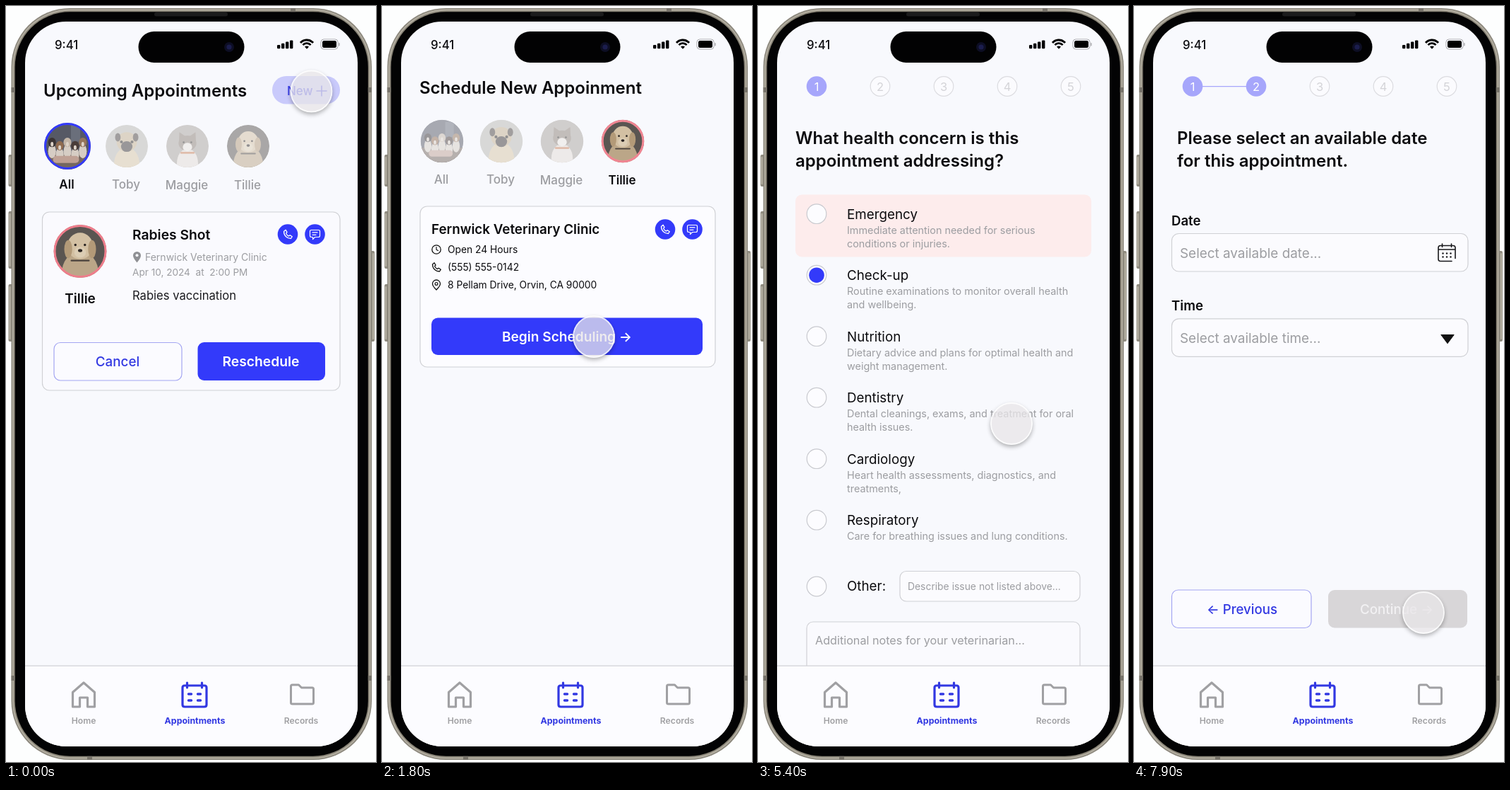
An HTML page with a canvas that plays this animation: 524 px wide and 1068 px high, repeating every 8 s.

```html
<!DOCTYPE html>
<html lang="en">
<head>
<meta charset="utf-8">
<title>Vet appointments</title>
<style>
html, body { margin: 0; width: 100%; height: 100%; overflow: hidden; background: #fdfefe; }
canvas { display: block; width: 524px; height: 1068px; }
</style>
</head>
<body>
<canvas id="stage"></canvas>
<script>
const W = 524, H = 1068, LOOP = 8000;
const SCREEN = { x: 27, y: 22, w: 471, h: 1024, r: 58 };
const BLUE = '#333afa', INK = '#0b0b0e', GREY = '#9c9da1', LINE = '#d0d1d5', LILAC = '#a6a6fb';
const CLINIC = 'Fernwick Veterinary Clinic';
const PETS = ['All', 'Toby', 'Maggie', 'Tillie'];
const ART = ['pack', 'pug', 'cat', 'pup'];

const canvas = document.getElementById('stage');
const ctx = canvas.getContext('2d');
const ratio = window.devicePixelRatio || 1;
canvas.width = W * ratio;
canvas.height = H * ratio;

// --- helpers ---
const clamp = v => Math.max(0, Math.min(1, v));
const ease = v => (1 - Math.cos(Math.PI * clamp(v))) / 2;
const mix = (a, b, p) => a + (b - a) * p;

function text(s, x, y, size, weight = 400, color = INK, align = 'left') {
  ctx.font = `${weight} ${size}px Inter, sans-serif`;
  ctx.textAlign = align;
  ctx.fillStyle = color;
  ctx.fillText(s, x, y);
}

function box(x0, y0, x1, y1, r, fill, stroke, lw = 1.2) {
  ctx.beginPath();
  ctx.roundRect(x0, y0, x1 - x0, y1 - y0, r);
  paint(fill, stroke, lw);
}

function oval(x, y, rx, ry, fill, stroke, lw = 1.2) {
  ctx.beginPath();
  ctx.ellipse(x, y, rx, ry, 0, 0, Math.PI * 2);
  paint(fill, stroke, lw);
}

function paint(fill, stroke, lw) {
  if (fill) { ctx.fillStyle = fill; ctx.fill(); }
  if (stroke) { ctx.strokeStyle = stroke; ctx.lineWidth = lw; ctx.stroke(); }
}

function shape(d, x, y, fill, stroke, lw) {
  ctx.save();
  ctx.translate(x, y);
  ctx.lineJoin = ctx.lineCap = 'round';
  const p = new Path2D(d);
  if (fill) { ctx.fillStyle = fill; ctx.fill(p); }
  if (stroke) { ctx.strokeStyle = stroke; ctx.lineWidth = lw; ctx.stroke(p); }
  ctx.restore();
}

function pair(x, y, rx, ry, color) {
  oval(-x, y, rx, ry, color);
  oval(x, y, rx, ry, color);
}

// --- pet pictures, drawn in a unit circle ---
const art = {
  pup() {
    oval(0, 0, 1, 1, '#5a5551');
    oval(0, 0.85, 0.7, 0.85, '#bba688');
    oval(0, -0.2, 0.48, 0.5, '#d3c0a3');
    pair(0.45, -0.08, 0.15, 0.34, '#b39a78');
    oval(0, 0.04, 0.22, 0.2, '#dccdb4');
    oval(0, -0.03, 0.08, 0.06, '#2a2422');
    pair(0.18, -0.24, 0.045, 0.045, '#2a2422');
    box(-0.36, 0.32, 0.36, 0.38, 0.03, '#4a423c');
  },
  pug() {
    oval(0, 0, 1, 1, '#b9b8b2');
    oval(0, 0.85, 0.6, 0.8, '#d8c6a6');
    oval(0, -0.2, 0.48, 0.46, '#c4b08f');
    pair(0.42, -0.42, 0.13, 0.2, '#4a423f');
    oval(0, 0.02, 0.27, 0.25, '#3a3534');
    pair(0.25, -0.2, 0.07, 0.07, '#2a2625');
  },
  cat() {
    oval(0, 0, 1, 1, '#aaa39d');
    oval(0, 0.8, 0.5, 0.68, '#e3dcd5');
    shape('M-.4 -.2L-.38 -.66L-.08 -.45ZM.4 -.2L.38 -.66L.08 -.45Z', 0, 0, '#8d8177');
    oval(0, -0.14, 0.42, 0.36, '#8d8177');
    oval(0, 0.04, 0.22, 0.2, '#ebe5df');
    pair(0.18, -0.18, 0.045, 0.045, '#33302c');
    box(-0.34, 0.27, 0.34, 0.36, 0.05, '#c9825a');
  },
  pack() {
    oval(0, 0, 1, 1, '#565965');
    box(-1, 0.3, 1, 1, 0, '#75675f');
    box(0.15, -0.9, 0.55, -0.2, 0, '#6a6f7b');
    const coats = ['#3b3434', '#8f6b50', '#c4b6a8', '#4a3d39', '#94755b'];
    coats.forEach((coat, i) => {
      const x = -0.66 + i * 0.33, y = i % 2 ? -0.02 : -0.16;
      oval(x, y + 0.38, 0.17, 0.3, '#d6cdc4');
      oval(x, y, 0.17, 0.2, coat);
      oval(x, y + 0.08, 0.06, 0.1, '#ddd3c9');
    });
    box(-0.62, 0.42, 0.5, 0.72, 0.15, '#bfa195');
  }
};

function avatar(kind, x, y, r, ring, faded) {
  ctx.save();
  ctx.translate(x, y);
  ctx.scale(r, r);
  ctx.beginPath();
  ctx.arc(0, 0, 1, 0, Math.PI * 2);
  ctx.clip();
  art[kind]();
  if (faded) box(-1, -1, 1, 1, 0, 'rgba(248,249,253,.5)');
  ctx.restore();
  if (ring) oval(x, y, r - 1.5, r - 1.5, null, ring, 3);
}

// --- shared interface parts ---
const HANDSET = 'M-5.5 -4C-5.5 2 -1 6 4.5 6L6.3 3.2L3.2 1.2L1.4 2.6Q-1.6 1 -2.4 -1.4L-1 -3L-2.9 -6.2Z';

function statusBar(shift = 0) {
  text('9:41', 69, 61, 16.8, 500);
  ctx.save();
  ctx.translate(shift, 0);
  for (let i = 0; i < 4; i++) box(384 + i * 6, 55 - i * 2.2, 388.4 + i * 6, 60.3, 1.2, '#000');
  [[12, 2.9], [7.4, 2.7]].forEach(([r, lw]) => {
    ctx.beginPath();
    ctx.arc(426, 60, r, -Math.PI * 0.77, -Math.PI * 0.23);
    paint(null, '#000', lw);
  });
  shape('M0 0L-3 -3.2Q0 -5.6 3 -3.2Z', 426, 60.8, '#000');
  box(446, 47, 470, 61, 4, null, '#a9a9ad', 1);
  box(448, 49, 468, 59, 2.5, '#000');
  box(471.2, 52, 472.6, 56.5, 1, '#a9a9ad');
  ctx.restore();
}

function navBar() {
  box(0, 932, W, H, 0, '#fcfcff');
  box(0, 931.6, W, 932.8, 0, '#d2d2d6');
  shape('M-15.5 -3.5L0 -17L15.5 -3.5V17H5.5V4H-5.5V17H-15.5Z', 110, 973, null, '#a0a0a3', 3.2);
  shape('M-14 -14H14Q17 -14 17 -11V13Q17 16 14 16H-14Q-17 16 -17 13V-11Q-17 -14 -14 -14ZM-10.5 -18V-11M10.5 -18V-11',
    267, 974, null, '#3238e2', 3.2);
  shape('M-8.5 -2H-4.5M4.5 -2H8.5M-8.5 7H-4.5M4.5 7H8.5', 267, 974, null, '#3238e2', 3.4);
  shape('M-16 -11Q-16 -13 -14 -13H-5L-1 -9H14Q16 -9 16 -7V12Q16 14 14 14H-14Q-16 14 -16 12Z', 419.5, 972, null, '#a0a0a3', 3);
  text('Home', 110, 1014, 12.2, 600, '#a0a0a3', 'center');
  text('Appointments', 267.5, 1014, 12.4, 700, '#3238e2', 'center');
  text('Records', 418, 1014, 12.2, 600, '#a0a0a3', 'center');
}

function contacts(x, y) {
  oval(x, y, 14.3, 14.3, BLUE);
  shape(HANDSET, x, y, null, '#fff', 1.3);
  oval(x + 38.5, y, 14.3, 14.3, BLUE);
  shape('M-5 -6H5Q7 -6 7 -4V2Q7 4 5 4H0L-3 7V4H-5Q-7 4 -7 2V-4Q-7 -6 -5 -6ZM-3.5 -2.6H3.5M-3.5 .8H1.5',
    x + 38.5, y, null, '#fff', 1.2);
}

function button(label, x0, y0, x1, y1, cx, size, kind = 'solid') {
  const look = {
    solid: [BLUE, null, '#fff', 600],
    outline: ['#fbfbff', '#a4a6f2', '#3238e2', 500],
    off: ['#d8d6d8', null, '#f2f1f3', 500]
  }[kind];
  box(x0, y0, x1, y1, 9, look[0], look[1]);
  text(label, cx, (y0 + y1) / 2 + 6.8, size, look[3], look[2], 'center');
}

function steps(done) {
  for (let i = 0; i < 5; i++) {
    const x = 83 + i * 90, on = i < done;
    if (on && i) box(x - 76, 113, x - 14, 114.3, 0, LILAC);
    oval(x, 113.5, on ? 14.3 : 13.8, on ? 14.3 : 13.8, on ? LILAC : '#fbfbfe', on ? null : '#dcdce0');
    text(i + 1, x, 119.5, 16.5, 400, on ? '#fff' : '#d4d4d8', 'center');
  }
}

// --- pages ---
function listPage() {
  statusBar();
  text('Upcoming Appointments', 53, 128, 24, 600);
  box(377, 99, 473, 138.5, 20, '#c9cafb');
  text('New', 398, 125.5, 17, 500, '#3a3fe8');
  shape('M-7 0H7M0 -7V7', 447, 120, null, '#3a3fe8', 1.6);
  [87, 171, 257, 343].forEach((x, i) => {
    avatar(ART[i], x, 198, i ? 30 : 33, i ? null : BLUE, i > 0);
    text(PETS[i], x - 1, i > 1 ? 259 : 258, 17, i ? 500 : 600, i ? GREY : INK, 'center');
  });
  box(51.5, 291, 473, 543, 10, '#fafafe', LINE);
  avatar('pup', 105, 346.5, 37.5, '#ee7d8b');
  text(PETS[3], 105, 420, 19, 600, INK, 'center');
  text('Rabies Shot', 179, 330, 19.3, 600);
  contacts(399, 322.5);
  shape('M0 8Q-5.5 1.5 -5.5 -2A5.5 5.5 0 0 1 5.5 -2Q5.5 1.5 0 8Z', 185.5, 354.5, '#8f9094');
  oval(185.5, 352.3, 2, 2, '#fafafe');
  text(CLINIC, 197, 360, 14, 400, GREY);
  text('Apr 10, 2024  at  2:00 PM', 179, 380.5, 13.6, 400, GREY);
  text('Rabies vaccination', 179, 415, 16.6, 400, '#1b1b1f');
  button('Cancel', 68, 475.5, 249, 529, 158, 18.8, 'outline');
  button('Reschedule', 271.5, 475, 452, 529, 361, 19.3);
  navBar();
}

function clinicPage() {
  statusBar();
  text('Schedule New Appoinment', 53, 124, 24, 600);
  [85, 169, 255, 341].forEach((x, i) => {
    const on = i === 3;
    avatar(ART[i], x, 191, 30.3, on ? '#f08592' : null, !on);
    text(PETS[i], x - 1, i > 1 ? 251.5 : 250.5, 17, on ? 600 : 500, on ? INK : GREY, 'center');
  });
  box(54, 283, 472, 510, 10, '#fcfcff', LINE);
  text(CLINIC, 70, 322, 18.8, 600);
  contacts(401, 315.5);
  oval(77, 344, 6.2, 6.2, null, '#111', 1.3);
  shape('M0 -3.4V.2L2.4 1.6', 77, 344, null, '#111', 1.2);
  shape(HANDSET, 77, 369, null, '#111', 1.3);
  shape('M0 7Q-5.5 1.5 -5.5 -1.5A5.5 5.5 0 0 1 5.5 -1.5Q5.5 1.5 0 7Z', 77, 394, null, '#111', 1.3);
  oval(77, 392.4, 1.9, 1.9, null, '#111');
  ['Open 24 Hours', '(555) 555-0142', '8 Pellam Drive, Orvin, CA 90000'].forEach((s, i) =>
    text(s, 93, 349 + i * 25.2, 13.8, 400));
  button('Begin Scheduling →', 70, 440.5, 454, 493, 262, 19.1);
  navBar();
}

const CONCERNS = [
  ['Emergency', 'Immediate attention needed for serious', 'conditions or injuries.'],
  ['Check-up', 'Routine examinations to monitor overall health', 'and wellbeing.'],
  ['Nutrition', 'Dietary advice and plans for optimal health and', 'weight management.'],
  ['Dentistry', 'Dental cleanings, exams, and treatment for oral', 'health issues.'],
  ['Cardiology', 'Heart health assessments, diagnostics, and', 'treatments,'],
  ['Respiratory', 'Care for breathing issues and lung conditions.', '']
];

function radio(y, on) {
  oval(83, y, 13.8, 13.8, '#fcfcff', '#c9cacf');
  if (on) oval(83, y, 10.8, 10.8, BLUE);
}

function concernPage(t) {
  statusBar();
  steps(1);
  text('What health concern is this', 53, 195, 24, 600);
  text('appointment addressing?', 53, 227, 24, 600);
  ctx.save();
  ctx.beginPath();
  ctx.rect(0, 248, W, 684);
  ctx.clip();
  ctx.translate(0, -scrollAt(t));
  box(53, 266.5, 472, 354.5, 9, '#fdecec');
  CONCERNS.forEach(([name, a, b], i) => {
    const y = 293.7 + i * 86.5;
    radio(y, i === 1 && t >= 3600);
    text(name, 126, y + 6.8, 18.8, 400);
    text(a, 126, y + 27.8, 14.4, 400, GREY);
    text(b, 126, y + 47, 14.4, 400, GREY);
  });
  radio(820, false);
  text('Other:', 126, 826, 18.8, 400);
  box(201, 798.5, 456, 841, 9, '#fbfbfe', LINE);
  text('Describe issue not listed above...', 212, 825, 13.9, 400, GREY);
  box(69, 870, 456, 1013, 9, '#fafafe', LINE);
  text('Additional notes for your veterinarian...', 81, 902, 16.2, 400, GREY);
  button('← Previous', 53.5, 1063.5, 251, 1117, 153, 18.6, 'outline');
  button('Continue →', 275, 1063, 472, 1117, 372, 18.8);
  ctx.restore();
  navBar();
}

function field(label, hint, y) {
  text(label, 53, y - 12, 18.6, 600);
  box(53.5, y, 473, y + 53.5, 10, '#fbfbfe', LINE);
  text(hint, 65, y + 34.3, 18.9, 400, GREY);
}

function datePage() {
  statusBar(-4);
  steps(2);
  text('Please select an available date', 61, 195, 24, 600);
  text('for this appointment.', 61, 227, 24, 600);
  field('Date', 'Select available date...', 321.5);
  field('Time', 'Select available time...', 441.8);
  shape('M7 12H-9Q-12 12 -12 9V-7Q-12 -10 -9 -10H9Q12 -10 12 -7V8M-12 -4.5H12M-6.5 -12.5V-8M6.5 -12.5V-8',
    443, 348.5, null, '#17171a', 1.6);
  for (let i = 0; i < 6; i++) oval(437.5 + (i % 3) * 5.5, 349.5 + (i > 2) * 5, 1.2, 1.2, '#17171a');
  shape('M-9 -6H9L0 6Z', 444, 470.5, '#111', '#111', 1.2);
  button('← Previous', 53.5, 825, 251, 878.5, 153, 18.6, 'outline');
  button('Continue →', 275, 825, 472, 878.5, 372, 18.8, 'off');
  navBar();
}

// --- timeline ---
const PAGES = [listPage, clinicPage, concernPage, datePage];
const SLIDES = [500, 1800, 6900], SLIDE_MS = 300;
const SCROLL = 231;
const scrollAt = t => SCROLL * ease((t - 5450) / 300);

const TOUCH = [
  [0, 432.5, 120.5], [900, 432.5, 120.5], [1500, 300, 467], [2600, 300, 467], [3300, 84, 382],
  [4300, 84, 382], [5100, 359, 590], [5450, 359, 590], [5750, 352, 590 - SCROLL],
  [5800, 352, 590 - SCROLL], [6336, 410, 857], [LOOP, 410, 857]
];

function touchAt(t) {
  const i = TOUCH.findIndex(k => k[0] > t);
  const [a, b] = [TOUCH[i - 1], TOUCH[i]];
  const p = ease((t - a[0]) / (b[0] - a[0]));
  return [mix(a[1], b[1], p), mix(a[2], b[2], p)];
}

function drawPage(index, dx, t) {
  ctx.save();
  ctx.translate(dx, 0);
  ctx.beginPath();
  ctx.rect(SCREEN.x, SCREEN.y, SCREEN.w, SCREEN.h);
  ctx.clip();
  box(0, 0, W, H, 0, '#f8f9fd');
  PAGES[index](t);
  ctx.restore();
}

function drawScreen(t) {
  const next = SLIDES.filter(s => t >= s).length;
  const p = next ? ease((t - SLIDES[next - 1]) / SLIDE_MS) : 1;
  ctx.save();
  ctx.beginPath();
  ctx.roundRect(SCREEN.x, SCREEN.y, SCREEN.w, SCREEN.h, SCREEN.r);
  ctx.clip();
  if (p < 1) {
    drawPage(next - 1, -SCREEN.w * p * 0.25, t);
    box(0, 0, W, H, 0, `rgba(0,0,0,${p * 0.5})`);
  }
  drawPage(next, SCREEN.w * (1 - p), t);
  ctx.restore();
}

function drawPhone() {
  box(0, 0, W, H, 0, '#fdfefe');
  [[210, 255], [290, 371], [393, 474]].forEach(([a, b]) => {
    box(3.5, a, 10, b, 2, '#8f8b7f');
    box(4.5, a + 3, 6.5, b - 3, 1, '#b9b4a7');
  });
  box(514, 346, 522, 474, 2, '#8f8b7f');
  box(519, 349, 521, 471, 1, '#b9b4a7');
  [[0, 83, '#8b877c'], [1.5, 82, '#b4afa2'], [3.4, 80, '#8a8578'], [5.2, 78, '#030304']].forEach(([d, r, c]) =>
    box(7.5 + d, 3 + d, 518 - d, 1065 - d, r, c));
  [115, 946].forEach(y => {
    box(7.5, y, 12.7, y + 7, 0, '#77736a');
    box(512.8, y, 518, y + 7, 0, '#77736a');
  });
  box(403, 3, 410, 8.2, 0, '#77736a');
  box(115, 1059.8, 122, 1065, 0, '#77736a');
  box(210, 9, 314, 14.5, 3, '#1b1b1c');
}

function drawIsland() {
  box(187.5, 36, 337.5, 80, 22, '#020203');
  oval(316, 58, 7, 7, '#0d0e24');
  oval(316, 58, 3.6, 3.6, '#1b1d4d');
}

function drawTouch(t) {
  const [x, y] = touchAt(t);
  ctx.save();
  // shadow only outside the translucent disc
  ctx.beginPath();
  ctx.rect(0, 0, W, H);
  ctx.arc(x, y, 29.5, 0, Math.PI * 2, true);
  ctx.clip('evenodd');
  ctx.shadowColor = 'rgba(0,0,0,.32)';
  ctx.shadowBlur = 6 * ratio;
  ctx.shadowOffsetY = 3 * ratio;
  oval(x, y, 29.5, 29.5, '#fff');
  ctx.restore();
  oval(x, y, 29, 29, 'rgba(232,230,233,.75)', 'rgba(255,255,255,.8)', 1.8);
}

function frame(now) {
  const t = now % LOOP;
  ctx.setTransform(ratio, 0, 0, ratio, 0, 0);
  drawPhone();
  drawScreen(t);
  drawIsland();
  drawTouch(t);
  requestAnimationFrame(frame);
}
requestAnimationFrame(frame);
</script>
</body>
</html>
```
